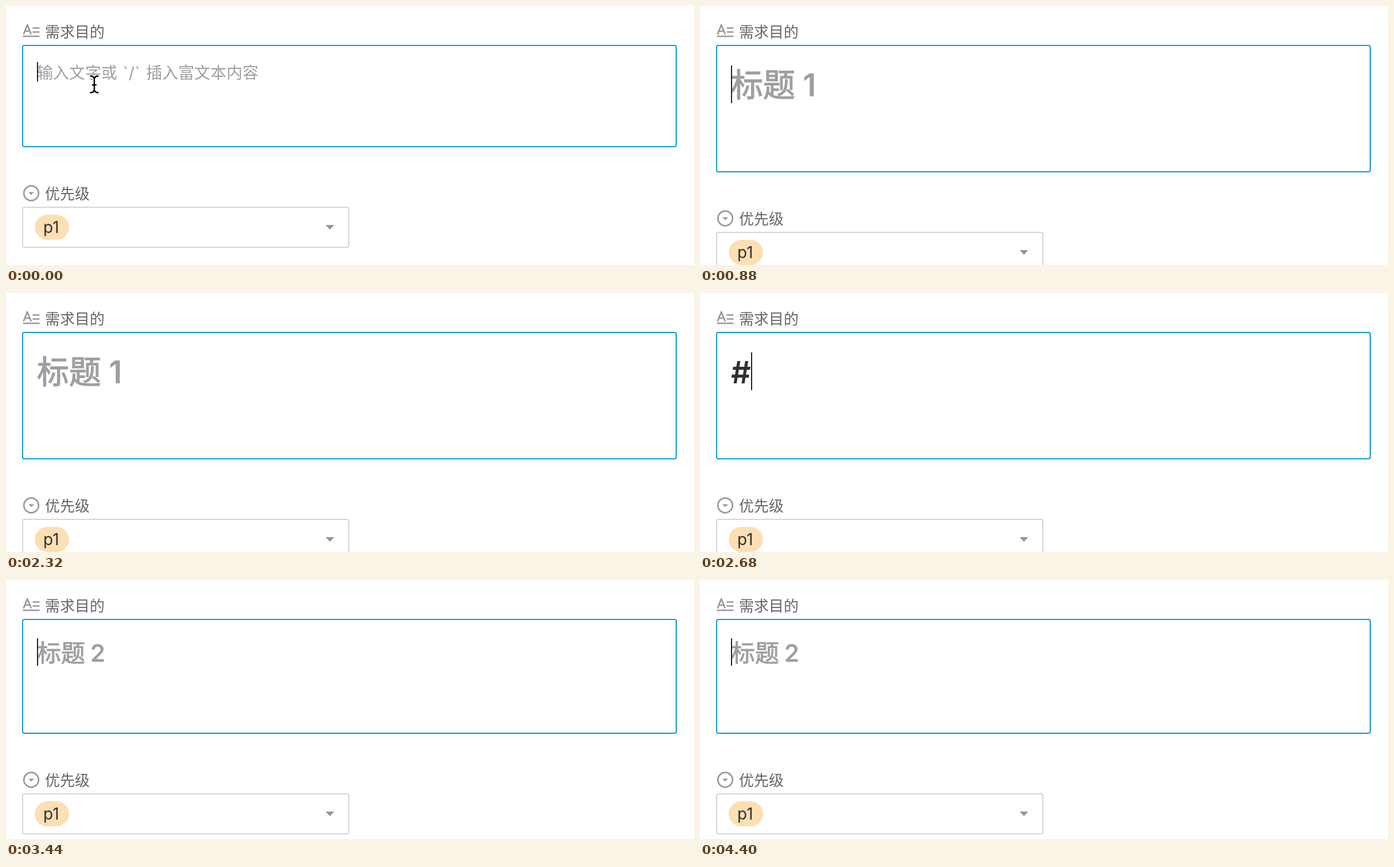
An HTML page for the animation above (4520 ms loop, 1200 px wide and 453 px high).

```html
<!DOCTYPE html>
<html lang="zh-CN">
<head>
<meta charset="utf-8">
<style>
html, body { margin: 0; width: 100%; height: 100%; overflow: hidden; background: #fff; }
svg { display: block; width: 1200px; height: 453px; }
text { font-family: "Noto Sans CJK SC", "Noto Sans CJK", sans-serif; font-weight: 400; }
.latin { font-family: Inter, "Noto Sans", sans-serif; }
.label { font-size: 26px; fill: #666; }
.hint { fill: #9f9f9f; }
.body { font-size: 28px; }
.ink { fill: #303030; }
.semi { font-weight: 600; }
.thick { stroke: #9f9f9f; stroke-width: 1.3px; }
.icon { fill: none; stroke: #999; stroke-width: 2.7px; stroke-linecap: round; stroke-linejoin: round; }
.beam { fill: none; stroke-linecap: round; }
</style>
</head>
<body>
<svg viewBox="0 0 1200 453">
  <path class="icon" d="M31 48.5 37.2 33 43.5 48.5M33.5 44H41M47.5 38.5H57.5M47.5 45.5H57.5M30.5 53H57.5"/>
  <text class="label" x="68" y="54.5">需求目的</text>
  <rect id="editor" x="29" y="69" width="1140" height="177" rx="3" fill="#fff" stroke="#0d9bd0" stroke-width="2"/>

  <g id="empty" class="body hint">
    <text x="54" y="126.5">输入文字或</text>
    <text class="latin" x="208.5 219 229" y="126.5" text-anchor="middle">`/`</text>
    <text x="244.5" y="126.5">插入富文本内容</text>
  </g>
  <text id="hash" class="latin body ink" x="54" y="126.5" style="font-size:27px">#</text>
  <g id="title1" class="hint">
    <text class="thick" x="54" y="158" font-size="56">标题</text>
    <text class="latin semi" x="191" y="158" font-size="55" text-anchor="middle">1</text>
  </g>
  <text id="bigHash" class="latin semi ink" x="54" y="158" font-size="54">#</text>
  <text id="bigHashes" class="latin semi ink" x="54 88.7" y="158" font-size="54">##</text>
  <g id="title2" class="hint">
    <text class="thick" x="54" y="142.5" font-size="42" style="stroke-width:1px">标题</text>
    <text class="latin semi" x="160" y="142.5" font-size="42" text-anchor="middle">2</text>
  </g>

  <rect id="caret" width="2" fill="#222"/>
  <g id="pointer" class="beam">
    <path id="beam" d="M147.5 122.5Q152.5 122.5 154 127Q155.5 122.5 160.5 122.5M154 126V148M147.5 151.5Q152.5 151.5 154 147Q155.5 151.5 160.5 151.5M151 138H157" stroke="#fff" stroke-width="5"/>
    <use href="#beam"/>
  </g>

  <g id="priority">
    <circle class="icon" cx="44" cy="327.5" r="12.8"/>
    <path d="M39 325.5H49L44 330.5Z" fill="#999"/>
    <text class="label" x="68" y="338">优先级</text>
    <rect x="29" y="352" width="569" height="70" rx="3" fill="#fff" stroke="#d6d6d6" stroke-width="2"/>
    <rect x="50" y="365" width="60" height="44" rx="22" fill="#fddfb4"/>
    <text class="latin body ink" x="65" y="397">p1</text>
    <path d="M557.5 383H572.5L565 391Z" fill="#959595"/>
  </g>
</svg>
<script>
const $ = id => document.getElementById(id);
const LOOP = 4520;

// Caret top and height, and how far the content below moves down
const views = {
  empty: [98, 34, 0], hash: [98, 34, 0],
  title1: [104, 66, 44], bigHash: [104, 66, 44], bigHashes: [104, 66, 44],
  title2: [102, 48, 22]
};

// Start time, view, caret x, caret opacity
const steps = [
  [0, 'empty', 54, 1], [280, 'empty', 54, 0],
  [480, 'hash', 70, 1],
  [880, 'title1', 54, 1], [1240, 'title1', 54, .5], [1360, 'title1', 54, 0],
  [1840, 'title1', 54, .5], [1960, 'title1', 54, 1],
  [2200, 'title1', 54, .5], [2320, 'title1', 54, 0],
  [2680, 'bigHash', 89, 1],
  [2840, 'bigHashes', 124, 1], [3320, 'bigHashes', 124, 0],
  [3440, 'title2', 54, 1], [3840, 'title2', 54, .5], [3920, 'title2', 54, 0],
  [4400, 'title2', 54, 1]
];

const show = (id, on) => $(id).style.display = on ? '' : 'none';
function set(id, attrs) {
  for (const name in attrs) $(id).setAttribute(name, attrs[name]);
}

// The pointer's dark core sits over its white outline
const core = $('beam').cloneNode();
core.removeAttribute('id');
core.setAttribute('stroke', '#000');
core.setAttribute('stroke-width', 2.4);
$('pointer').querySelector('use').replaceWith(core);

function draw(t) {
  const [, view, x, opacity] = steps.findLast(s => s[0] <= t);
  const [y, height, drop] = views[view];
  for (const id in views) show(id, id === view);
  show('pointer', t < 280);
  set('caret', { x, y, height, opacity });
  set('editor', { height: 177 + drop });
  set('priority', { transform: `translate(0 ${drop})` });
}

const start = performance.now();
function tick() {
  draw((performance.now() - start) % LOOP);
  requestAnimationFrame(tick);
}
tick();
</script>
</body>
</html>
```
